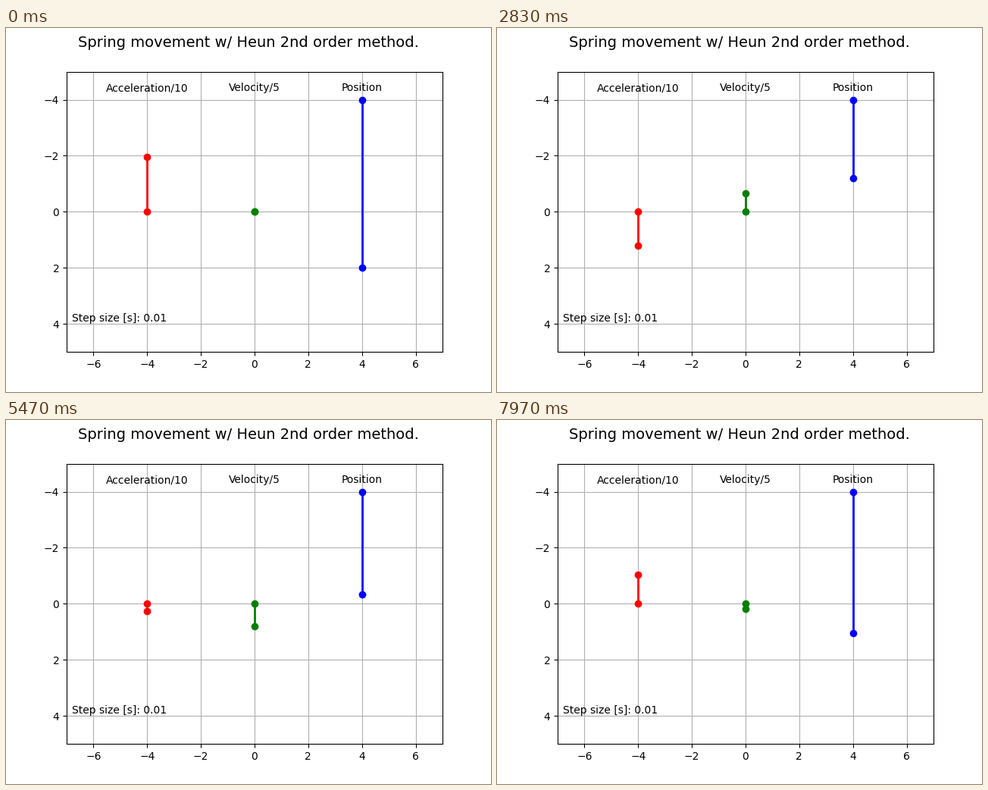
A matplotlib script that plays this animation: 640x480 px, repeating every 8000 ms.

```python
import math

import matplotlib.pyplot as plt
from matplotlib.animation import FuncAnimation

FRAMES = 240
LOOP_MS = 8000
START = 0.018    # seconds before the mass is released
X0 = 2.0         # initial displacement
OMEGA = 3.13     # damped angular frequency
GAMMA = 0.077    # decay rate
ANCHOR = -4

plt.rcParams["font.family"] = "DejaVu Sans"


def spring(t):
    """Position, velocity and acceleration of the damped spring."""
    decay = X0 * math.exp(-GAMMA * t)
    s, c = math.sin(OMEGA * t), math.cos(OMEGA * t)
    k = OMEGA ** 2 + GAMMA ** 2
    pos = decay * (c + GAMMA / OMEGA * s)
    vel = -decay * k / OMEGA * s
    acc = -k * pos - 2 * GAMMA * vel
    return pos, vel, acc


fig, ax = plt.subplots(figsize=(6.4, 4.8), dpi=100)
fig.suptitle("Spring movement w/ Heun 2nd order method.", fontsize=14)
ax.set_xlim(-7, 7)
ax.set_ylim(5, -5)
ax.grid(True)

for x, label in ((-4, "Acceleration/10"), (0, "Velocity/5"), (4, "Position")):
    ax.text(x, -4.3, label, ha="center")
ax.text(-6.8, 3.9, "Step size [s]: 0.01")


def bar(x, color):
    return ax.plot([x, x], [0, 0], "o-", color=color, lw=2)[0]


acc_bar, vel_bar, pos_bar = bar(-4, "r"), bar(0, "g"), bar(4, "b")


def update(i):
    t = max(0.0, i * LOOP_MS / FRAMES / 1000 - START)
    pos, vel, acc = spring(t)
    acc_bar.set_ydata([0, acc / 10])
    vel_bar.set_ydata([0, vel / 5])
    pos_bar.set_ydata([ANCHOR, pos])
    return acc_bar, vel_bar, pos_bar


anim = FuncAnimation(fig, update, frames=FRAMES, interval=LOOP_MS / FRAMES,
                     init_func=lambda: update(0), repeat=True, repeat_delay=0)
plt.show()
```
